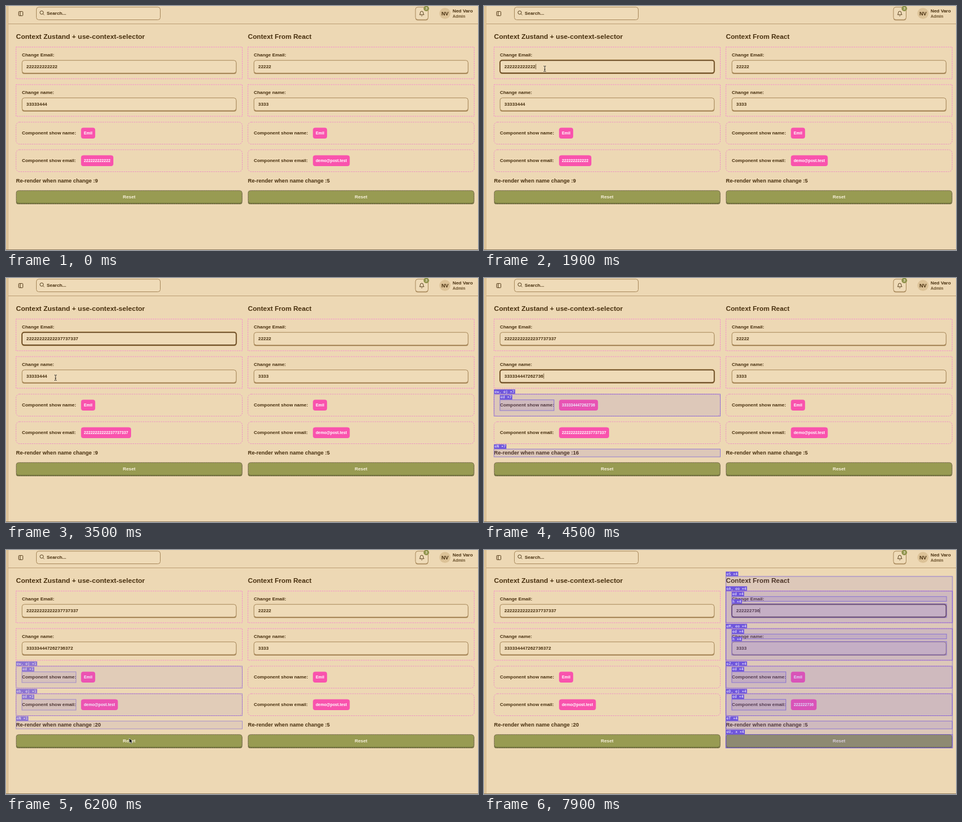
An HTML page that plays this animation: 800x416 px, repeating every 8 s.

```html
<!DOCTYPE html>
<html lang="en">
<head>
<meta charset="utf-8">
<title>Context re-render demo</title>
<style>
  html, body { margin: 0; width: 100%; height: 100%; overflow: hidden; background: #edd8b4; }
  svg { display: block; width: 800px; height: 416px; }
  text { font: bold 7.92px "Liberation Sans", Arial, sans-serif; fill: #48300f; white-space: pre; }
  .tag text { font: 6.2px "DejaVu Sans Mono", monospace; fill: #fff; }
</style>
</head>
<body>
<svg id="stage" viewBox="0 0 800 416"></svg>
<script>
const LOOP = 8000;
const COLUMN_GAP = 393;
const DEFAULT_NAME = "Emil";
const DEFAULT_EMAIL = "demo@post.test";
const RESET_AT = 6000;
const PURPLE = "#6f56dc";
const stage = document.getElementById("stage");

function add(parent, tag, attrs = {}, content) {
  const node = document.createElementNS("http://www.w3.org/2000/svg", tag);
  set(node, attrs);
  if (content !== undefined) node.textContent = content;
  parent.append(node);
  return node;
}
function set(node, attrs) {
  for (const key in attrs) node.setAttribute(key, attrs[key]);
}
function rect(parent, x, y, width, height, attrs) {
  return add(parent, "rect", { x, y, width, height, fill: "none", ...attrs });
}
function label(parent, x, y, content, size = 7.92, extra = {}) {
  return add(parent, "text", { x, y, style: `font-size:${size}px`, ...extra }, content);
}
const clamp = v => Math.max(0, Math.min(1, v));
const ease = v => v * v * (3 - 2 * v);

// Header and page frame
function drawHeader() {
  rect(stage, 0, 0, 800, 416, { fill: "#edd8b4" });
  rect(stage, 0, 0, 3.5, 416, { fill: "#e0c79d" });
  rect(stage, 3.2, 0, .8, 416, { fill: "#cdb083" });
  rect(stage, 4, 30, 796, 1, { fill: "#bd9f76" });
  rect(stage, 0, 415, 800, 1, { fill: "#8f7c60" });

  const line = { stroke: "#48300f", "stroke-width": .9, fill: "none" };
  rect(stage, 21.4, 9.4, 7.2, 7.2, { ...line, rx: 1 });
  add(stage, "path", { d: "M24 9.4v7.2", ...line });

  rect(stage, 51.5, 2, 210, 21.5, { rx: 4, fill: "#efdbb8", stroke: "#a98a5d" });
  add(stage, "circle", { cx: 60.5, cy: 11.2, r: 2.9, ...line });
  add(stage, "path", { d: "M62.7 13.4l2 2", ...line });
  label(stage, 69, 15.3, "Search...");

  rect(stage, 694, 3.5, 21.5, 21, { rx: 4, fill: "#a98a5d" });
  rect(stage, 694, 2, 21.5, 21.3, { rx: 4, fill: "#efdbb8", stroke: "#a98a5d" });
  add(stage, "path", { d: "M701 14.8q1.2-1.2 1.2-3.3a2.5 2.5 0 0 1 5 0q0 2.1 1.2 3.3zM703.8 16.6q.9.9 1.8 0", ...line });
  add(stage, "circle", { cx: 712.4, cy: 4.2, r: 4.7, fill: "#8f934c" });
  label(stage, 712.4, 6.4, "3", 6, { "text-anchor": "middle", style: "font-size:6px;fill:#f6ecd6" });

  add(stage, "circle", { cx: 744, cy: 12.6, r: 9.4, fill: "#dcc297" });
  label(stage, 744, 15.9, "NV", 8.8, { "text-anchor": "middle" });
  label(stage, 757, 10.6, "Ned Varo");
  label(stage, 757, 20.2, "Admin", 6.9, { style: "font-size:6.9px;fill:#69502b" });
}

function makeField(parent, title, y) {
  const dash = { stroke: "#f585cf", "stroke-width": .9, "stroke-dasharray": "2.4 1.4" };
  rect(parent, 17, y, 383.5, 54, dash);
  label(parent, 27, y + 16, title);
  const halo = rect(parent, 26, y + 21.2, 365.5, 24.6, { rx: 5, fill: "#b79561" });
  rect(parent, 27, y + 24, 363.5, 22, { rx: 4, fill: "#a78757" });
  const box = rect(parent, 27.2, y + 22.7, 363, 21.6, { rx: 4, fill: "#efdbb8" });
  const value = label(parent, 34.5, y + 36.2, "");
  const caret = rect(parent, 0, y + 28.8, .7, 9, { fill: "#48300f" });
  return (text, focused, caretOn) => {
    value.textContent = text;
    halo.setAttribute("visibility", focused ? "visible" : "hidden");
    set(box, { stroke: focused ? "#60411a" : "#a98a5d", "stroke-width": focused ? 1.5 : 1 });
    caret.setAttribute("visibility", focused && caretOn ? "visible" : "hidden");
    caret.setAttribute("x", 34.8 + value.getComputedTextLength());
  };
}

function makeShow(parent, title, y) {
  rect(parent, 17, y, 383.5, 37.5, { rx: 6, stroke: "#ec8cc4", "stroke-width": .9, "stroke-dasharray": "2.4 1.4" });
  label(parent, 27, y + 21.4, title);
  const pill = rect(parent, 127.2, y + 9.5, 0, 18.5, { rx: 4, fill: "#f953ad" });
  const value = label(parent, 132, y + 21, "", 6.75, { style: "font-size:6.75px;fill:#fff" });
  return text => {
    value.textContent = text;
    pill.setAttribute("width", value.getComputedTextLength() + 9.7);
  };
}

function makeColumn(x, title, titleSize) {
  const g = add(stage, "g", { transform: `translate(${x} 0)` });
  label(g, 17, 56.2, title, titleSize);
  const column = {
    email: makeField(g, "Change Email:", 70),
    name: makeField(g, "Change name:", 134),
    showName: makeShow(g, "Component show name:", 198),
    showEmail: makeShow(g, "Component show email:", 245)
  };
  const count = label(g, 17, 301, "", 9.03);
  column.count = n => { count.textContent = "Re-render when name change :" + n; };
  rect(g, 17, 316, 383.5, 22, { rx: 4, fill: "#6c7034" });
  rect(g, 17.4, 314.7, 382.7, 21.3, { rx: 4, fill: "#989b52", stroke: "#75793b", "stroke-width": .9 });
  rect(g, 17.4, 314.7, 382.7, 22.5, { rx: 4, stroke: "#a9789a", "stroke-width": .5, "stroke-dasharray": "2.4 1.4" });
  label(g, 208.7, 328, "Reset", 7.92, { "text-anchor": "middle", style: "font-size:7.92px;fill:#f8f0dc" });
  return column;
}

// Typing bursts
const burst = (base, added, start, gap) => ({
  start, gap, total: added.length,
  last: start + gap * (added.length - 1),
  hits(t) { return t < start ? 0 : Math.min(added.length, Math.floor((t - start) / gap) + 1); },
  text(t) { return base + added.slice(0, this.hits(t)); }
});
const emailBurst = burst("222222222222", "37737337", 2050, 110);
const nameBurst = burst("33333444", "7262736372", 3800, 110);
const rightBurst = burst("22222", "2736", 7400, 140);
const resetBurst = burst("", "1", RESET_AT, 100);

// Render highlights: [label, x, y, width, height], relative to the left column
const fieldMarks = (id, y) => [
  [id + ", eo", 17, y, 384, 54],
  ["ed", 27, y + 9.3, 364, 8.2],
  ["h", 27, y + 22, 364, 23]
];
const showMarks = (id, y) => [
  [id + ", ej", 17, y, 383.5, 37.5],
  ["ed", 27, y + 9.7, 91.7, 18.3]
];
const countMark = id => [id, 17, 291.7, 383.5, 13.3];

function makeScan(x, typing, marks) {
  const g = add(stage, "g", { transform: `translate(${x} 0)` });
  for (const [, mx, my, w, h] of marks)
    rect(g, mx, my, w, h, { fill: PURPLE, "fill-opacity": .12, stroke: PURPLE, "stroke-width": .9, "stroke-opacity": .75 });
  const tags = marks.map(([id, mx, my]) => {
    const tag = add(g, "g", { class: "tag" });
    rect(tag, mx - .2, my - 8.2, (id.length + 3) * 3.72 + 2.5, 7.8, { fill: PURPLE });
    return [id, add(tag, "text", { x: mx + 1, y: my - 2.3 })];
  });
  return t => {
    const hits = typing.hits(t);
    const age = hits ? t - typing.start - typing.gap * (hits - 1) : 0;
    g.setAttribute("opacity", hits ? clamp(1 - (age - 100) / 430) : 0);
    for (const [id, node] of tags) node.textContent = `${id} ×${hits}`;
  };
}

drawHeader();
const left = makeColumn(0, "Context Zustand + use-context-selector", 11.62);
const right = makeColumn(COLUMN_GAP, "Context From React", 11.35);

const scans = [
  makeScan(0, emailBurst, showMarks("eb", 245)),
  makeScan(0, nameBurst, [...showMarks("ew", 198), countMark("eN")]),
  makeScan(0, resetBurst, [...showMarks("ew", 198), ...showMarks("eb", 245), countMark("eN")]),
  makeScan(COLUMN_GAP, rightBurst, [
    ["eS", 17, 45, 384, 292.5],
    ...fieldMarks("eA", 70), ...fieldMarks("eM", 134),
    ...showMarks("eZ", 198), ...showMarks("eD", 245),
    countMark("eT"), ["eU, x", 17, 314.5, 384, 23]
  ])
];

// Mouse: each track is a visible stretch of [time, x, y]
const tracks = [
  [[1000, 230, -14], [1600, 103, 107], [2050, 103, 107]],
  [[3050, 103, 107], [3450, 84, 170], [3800, 84, 170]],
  [[4950, 84, 170], [5400, 114, 269.5], [5850, 205, 324], [6150, 205, 324], [6900, 503.5, 103], [7400, 503.5, 103]]
];
const mouse = add(stage, "g");
const arrow = add(mouse, "path", { d: "M0 0v8l1.9-1.7 1.3 2.8 1.5-.7-1.3-2.7h2.5z", fill: "#000", stroke: "#fff", "stroke-width": .6 });
const beam = add(mouse, "g", { fill: "none" });
for (const [stroke, width] of [["#f6ead2", 1.9], ["#20180c", .9]])
  add(beam, "path", { d: "M-2-4.6q1.6 0 2 .9q.4-.9 2-.9M-2 4.6q1.6 0 2-.9q.4.9 2 .9M0-3.7v7.4M-1 1.2h2", stroke, "stroke-width": width });

function drawMouse(t) {
  const track = tracks.find(p => t >= p[0][0] && t < p[p.length - 1][0]);
  mouse.setAttribute("visibility", track ? "visible" : "hidden");
  if (!track) return;
  const next = track.findIndex(p => p[0] > t);
  const [t0, x0, y0] = track[next - 1], [t1, x1, y1] = track[next];
  const k = ease((t - t0) / (t1 - t0));
  const x = x0 + (x1 - x0) * k, y = y0 + (y1 - y0) * k;
  const inField = [92, 156].some(top => y > top && y < top + 23) &&
    [27, 27 + COLUMN_GAP].some(side => x > side && x < side + 364);
  mouse.setAttribute("transform", `translate(${x} ${y})`);
  arrow.setAttribute("display", inField ? "none" : "inline");
  beam.setAttribute("display", inField ? "inline" : "none");
}

function drawField(field, typing, t, from, to) {
  const since = t >= typing.last ? typing.last : t >= typing.start ? t : from;
  field(typing.text(t), t >= from && t < to, (t - since) % 1000 < 500);
}

function render(t) {
  const reset = t >= RESET_AT;
  drawField(left.email, emailBurst, t, 1700, 3600);
  drawField(left.name, nameBurst, t, 3600, RESET_AT);
  drawField(right.email, rightBurst, t, 7100, LOOP);
  right.name("3333", false, false);

  left.showName(reset || !nameBurst.hits(t) ? DEFAULT_NAME : nameBurst.text(t));
  left.showEmail(reset ? DEFAULT_EMAIL : emailBurst.text(t));
  left.count(9 + nameBurst.hits(t) + resetBurst.hits(t));
  right.showName(DEFAULT_NAME);
  right.showEmail(rightBurst.hits(t) ? rightBurst.text(t) : DEFAULT_EMAIL);
  right.count(5);

  for (const scan of scans) scan(t);
  drawMouse(t);
}

function tick() {
  render(performance.now() % LOOP);
  requestAnimationFrame(tick);
}
tick();
</script>
</body>
</html>
```
